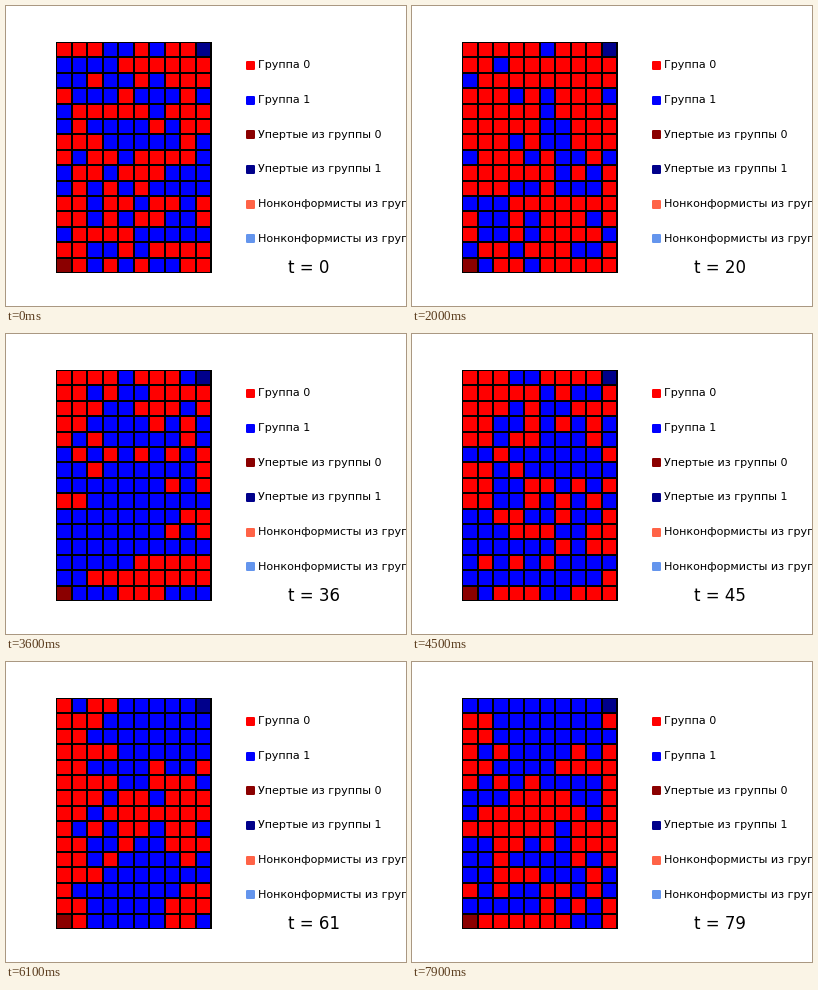
Recreate the animation shown at these times as a matplotlib script. Size 400 by 300 pixels, loop 8000 ms.

```python
import numpy as np
import matplotlib.pyplot as plt
from matplotlib.animation import FuncAnimation
from matplotlib.colors import ListedColormap
from matplotlib.patches import Rectangle

W, H, DPI = 400, 300, 100
ROWS, COLS, STEPS = 15, 10, 80
X0, X1, Y0, Y1 = 50, 205, 36, 267
COLORS = ["red", "blue", "darkred", "darkblue", "tomato", "cornflowerblue"]
LABELS = ["Группа 0", "Группа 1", "Упертые из группы 0", "Упертые из группы 1",
          "Нонконформисты из группы 0", "Нонконформисты из группы 1"]

# two drifting strongholds of group 1: (time, row, column, strength)
UPPER = [(0, 6, 5, .2), (20, 7.5, 6.5, .5), (36, 6.5, 4.5, .9),
         (54, 3, 7, 1), (69, .5, 5, 1), (79, .5, 5, 1)]
LOWER = [(0, 12, 3, .2), (20, 13, 2, .3), (36, 11, 0, .8),
         (54, 13, 4, .7), (69, 12, 6.5, 1), (79, 12, 5, .4)]
rows, cols = np.mgrid[:ROWS, :COLS]


def stronghold(path, t):
    times, *tracks = zip(*path)
    row, col, strength = (np.interp(t, times, track) for track in tracks)
    return strength * np.exp(-((rows - row) / 3.2) ** 2 - ((cols - col) / 5) ** 2)


def lean(t):
    """Pull towards group 1 felt in every cell."""
    return np.clip(0.17 + stronghold(UPPER, t) + stronghold(LOWER, t), 0, 1)


def neighbour_share(g):
    p = np.pad(g, 1, mode="edge")
    return (p[:-2, 1:-1] + p[2:, 1:-1] + p[1:-1, :-2] + p[1:-1, 2:]) / 4


def pin(g):
    """The two stubborn people never change their minds."""
    g[-1, 0], g[0, -1] = 0, 1
    return g


def simulate():
    rng = np.random.default_rng(7)
    g = pin((rng.random((ROWS, COLS)) < 0.47).astype(int))
    history = [g]
    for t in range(1, STEPS):
        p = (neighbour_share(g) + lean(t)) / 2
        g = pin((rng.random(g.shape) < p).astype(int))
        history.append(g)
    return history


def paint(g):
    shown = g.copy()
    shown[-1, 0], shown[0, -1] = 2, 3
    return shown


history = simulate()
fig = plt.figure(figsize=(W / DPI, H / DPI), dpi=DPI, facecolor="white")
ax = fig.add_axes([0, 0, 1, 1])
ax.axis("off")

xs = np.linspace(X0, X1, COLS + 1)
ys = np.linspace(Y0, Y1, ROWS + 1)
cells = ax.pcolormesh(xs, ys, paint(history[0]), cmap=ListedColormap(COLORS),
                      vmin=0, vmax=5)
ax.set(xlim=(0, W), ylim=(H, 0))

frame = Rectangle((X0, Y0), X1 + 1 - X0, Y1 - Y0, transform=ax.transData)
grid = [([x, x], [Y0, Y1]) for x in xs] + [([X0, X1 + 1], [y, y]) for y in ys]
for px, py in grid:
    line, = ax.plot(px, py, color="black", lw=2 * 72 / DPI,
                    solid_capstyle="butt", scalex=False, scaley=False)
    line.set_clip_path(frame)

for i, (color, label) in enumerate(zip(COLORS, LABELS)):
    y = 59 + 34.7 * i
    ax.add_patch(Rectangle((241, round(y) - 3), 7, 7, color=color,
                           lw=2 * 72 / DPI, joinstyle="round"))
    ax.text(251.5, y + 3.2, label, fontsize=8, family="DejaVu Sans")

clock = ax.text(281.5, 267, "t = 0", fontsize=12, family="DejaVu Sans")


def update(t):
    cells.set_array(paint(history[t]))
    clock.set_text(f"t = {t}")
    return cells, clock


anim = FuncAnimation(fig, update, frames=STEPS, interval=100,
                     repeat=True, repeat_delay=0, blit=False)
plt.show()
```
